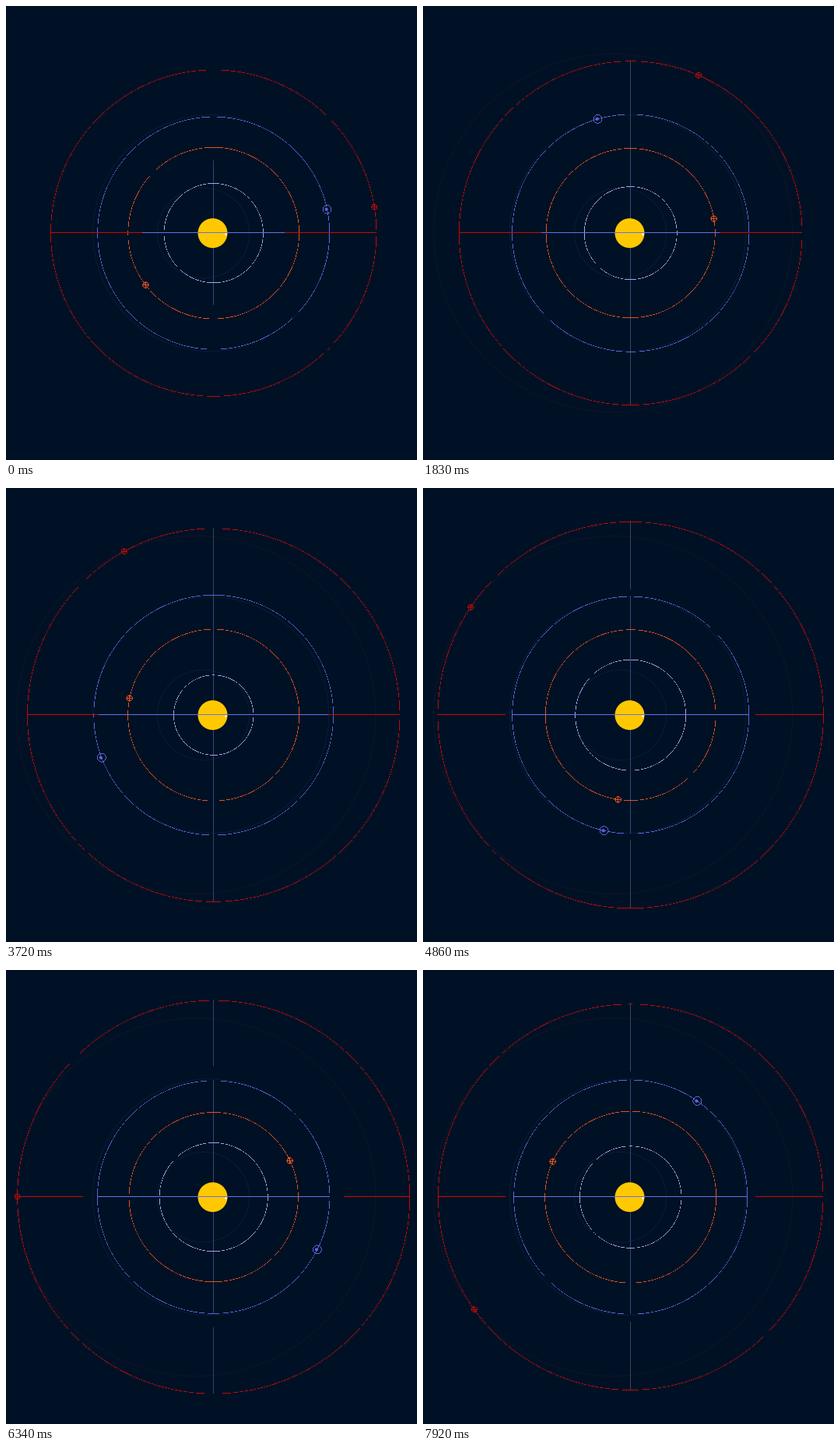
Write a matplotlib script that moves like this. It is 528x582 px and loops after 8000 ms.

```python
import math
import numpy as np
import matplotlib.pyplot as plt
from matplotlib.animation import FuncAnimation
from matplotlib.patches import Circle, Ellipse

W, H, DPI = 528, 582, 100
PX = 72 / DPI
CX, CY = 265.2, 290.6
ROW, COL = 290, 265
LOOP, TICK = 8000, 40

BG = "#001125"
RED, ORANGE, BLUE, PALE = "#be0a05", "#e1541a", "#5a64dc", "#a0a6ea"
AXIS_RED, AXIS_BLUE, AXIS_DIM, AXIS_GREY = "#c80800", "#6470e6", "#37457a", "#3a4460"
SUN = "#ffc800"
RED_TRAIL, BLUE_TRAIL = "#121328", "#0a1b3a"

# semi-major axis, eccentricity, mean anomaly at start, degrees per step
ORBITS = {
    "mercury": (59.1, 0.2056, 258.7, 18.15),
    "venus": (109.3, 0.0068, 217.9, 7.223),
    "earth": (151.5, 0.0167, 11.4, 4.42),
    "mars": (230.5, 0.0934, 7.6, 2.359),
}
COLORS = {"mercury": PALE, "venus": ORANGE, "earth": BLUE, "mars": RED}
TRAILS = {"mercury": BLUE_TRAIL, "earth": BLUE_TRAIL, "mars": RED_TRAIL}
MARKER_RADIUS = {"venus": 3.6, "earth": 5.4, "mars": 3.4}

fig = plt.figure(figsize=(W / DPI, H / DPI), dpi=DPI, facecolor=BG)
ax = fig.add_axes([0, 0, 1, 1])
ax.set_xlim(-0.5, W - 0.5)
ax.set_ylim(H - 0.5, -0.5)
ax.axis("off")


def dots(color, z):
    """Artist made of single pixels."""
    return ax.plot([], [], ",", color=color, zorder=z)[0]


def ring(cx, cy, r, tol=0.5):
    """Whole pixels within tol of a circle; a small tol leaves it broken."""
    def caps(c, other):
        reach = r * math.sqrt(0.5)
        u = np.arange(math.ceil(c - reach), math.floor(c + reach) + 1)
        d = np.sqrt(r * r - (u - c) ** 2)
        u, v = np.tile(u, 2), np.concatenate([other - d, other + d])
        keep = np.abs(v - np.round(v)) <= tol
        return u[keep], np.round(v[keep])

    x1, y1 = caps(cx, cy)
    y2, x2 = caps(cy, cx)
    return np.concatenate([x1, x2]), np.concatenate([y1, y2])


def span(center, start, end):
    """Pixel positions on both sides of a center."""
    k = np.arange(round(start), round(end) + 1)
    return np.concatenate([center - k, center + k])


trails = {}
for name, color in TRAILS.items():
    a, e, _, _ = ORBITS[name]
    trails[name] = ax.add_patch(
        Ellipse((CX - a * e, CY), 2 * a, 2 * a * math.sqrt(1 - e * e),
                fill=False, ec=color, lw=PX, zorder=1))

inner_v, outer_v = dots(AXIS_DIM, 2), dots(AXIS_GREY, 2)
circles = {name: dots(color, 3) for name, color in COLORS.items()}
ax.add_patch(Circle((COL, 290.7), 19, color=SUN, lw=0, zorder=5))
inner_h, outer_h = dots(AXIS_BLUE, 6), dots(AXIS_RED, 6)
ax.add_patch(Circle((282, 292), 1.3, color="white", lw=0, zorder=7))
markers = {name: dots(COLORS[name], 8) for name in MARKER_RADIUS}
core = ax.add_patch(Circle((0, 0), 2.1, color=BLUE, lw=0, zorder=8))


def locate(name, step):
    """Kepler position: distance from the sun and x, y on the stage."""
    a, e, start, rate = ORBITS[name]
    mean = math.radians(start + rate * step)
    ecc = mean
    for _ in range(6):
        ecc -= (ecc - e * math.sin(ecc) - mean) / (1 - e * math.cos(ecc))
    x = CX + a * (math.cos(ecc) - e)
    y = CY - a * math.sqrt(1 - e * e) * math.sin(ecc)
    return a * (1 - e * math.cos(ecc)), x, y


def draw_marker(name, x, y):
    r = MARKER_RADIUS[name]
    xs, ys = ring(x, y, r)
    if name == "earth":
        core.center = x, y
    else:
        k = np.arange(-round(r), round(r) + 1)
        cx, cy = np.full(k.size, round(x)), np.full(k.size, round(y))
        xs = np.concatenate([xs, cx + k, cx])
        ys = np.concatenate([ys, cy, cy + k])
    markers[name].set_data(xs, ys)


def step_at(ms):
    return int(np.interp(ms, [0, 1830, 2580, 7920], [0, 21, 30, 91]) + 0.2)


def update(frame):
    step = step_at(frame * TICK + TICK / 2)
    dist = {}
    for name, circle in circles.items():
        dist[name], x, y = locate(name, step)
        circle.set_data(*ring(CX, CY, dist[name], 0.36))
        if name in markers:
            draw_marker(name, x, y)

    far = dist["mars"]
    gap = math.sqrt(max(far ** 2 - 187.9 ** 2, 0))
    near = min(gap, dist["earth"])
    for center, inner, outer, flip in ((COL, inner_h, outer_h, False),
                                       (ROW, inner_v, outer_v, True)):
        for artist, limits in ((inner, (0, near)), (outer, (gap, far))):
            along = span(center, *limits)
            across = np.full(along.size, COL if flip else ROW)
            artist.set_data(*((across, along) if flip else (along, across)))
    for artist in (outer_v, trails["mars"]):
        artist.set_visible(step > 0)
    return []


anim = FuncAnimation(fig, update, frames=LOOP // TICK, interval=TICK,
                     init_func=lambda: [], repeat=True, repeat_delay=0)
plt.show()
```
